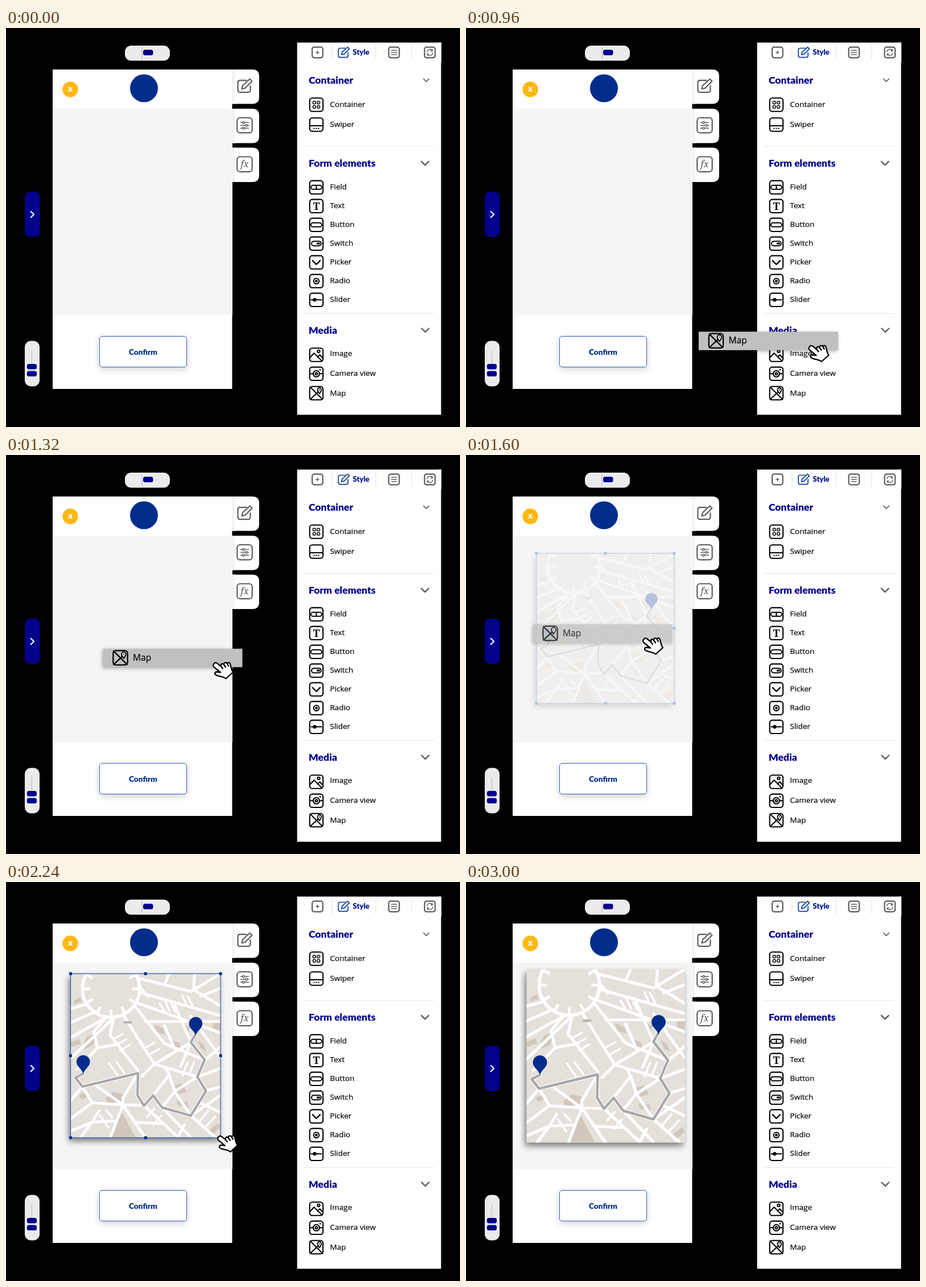
An HTML page for the animation above (3200 ms loop, 798 by 702 pixels).

```html
<!DOCTYPE html>
<html lang="en">
<head>
<meta charset="utf-8">
<title>Drag a map into the layout</title>
<style>
html, body { margin: 0; width: 100%; height: 100%; overflow: hidden; background: #000; }
svg { display: block; }
.head { font: 900 17.6px Lato, sans-serif; fill: #00008b; }
.bold { font: 900 13px Lato, sans-serif; fill: #002d8c; }
.item { font: 500 13.5px "Open Sans", "Noto Sans", sans-serif; fill: #000; stroke: #000; stroke-width: .2px; }
.line { fill: none; stroke-linecap: round; stroke-linejoin: round; }
.icon { stroke: #000; stroke-width: 2.1; }
.grey { stroke: #5c5c5c; stroke-width: 2.2; }
.blue { stroke: #0b3c9c; stroke-width: 2.2; }
.lift { filter: drop-shadow(-1px 2px 3px rgba(0,0,0,.3)); }
.deep { filter: drop-shadow(-3px 6px 5.5px rgba(0,0,0,.5)); }
.soft { filter: drop-shadow(0 3px 6px rgba(0,0,0,.2)); }
</style>
</head>
<body>
<svg id="stage" width="798" height="702" viewBox="0 0 798 702">
  <defs>
    <linearGradient id="edge"><stop stop-color="#ececec"/><stop offset="1" stop-color="#fff"/></linearGradient>
    <clipPath id="mapClip"><rect width="278" height="305"/></clipPath>
    <path id="pin" d="M0 0C-3 -10 -12.5 -13 -12.5 -22A12.5 12.5 0 0 1 12.5 -22C12.5 -13 3 -10 0 0Z" fill="#002d8c"/>
  </defs>
  <rect width="798" height="702"/>
  <g id="phone"></g>
  <g id="panel"></g>
  <g id="map">
    <rect id="mapBase" class="deep" fill="#e5e0d9"/>
    <g id="mapArt" clip-path="url(#mapClip)"></g>
    <g id="frame"></g>
  </g>
  <g id="bar">
    <rect class="lift" width="245" height="32.5" fill="#c1bfbf"/>
    <g id="barIcon" transform="translate(30.5 16) scale(1.08)"></g>
    <text class="item" x="52.5" y="21" style="font-size:15.6px">Map</text>
  </g>
  <path id="hand" fill="#fff" stroke="#000" stroke-width="2.3" stroke-linejoin="round"/>
</svg>
<script>
const $ = id => document.getElementById(id);
const path = (d, cls = "icon", extra = "") => `<path class="line ${cls}" d="${d}" ${extra}/>`;
const box = (x, y, w, h, r, fill, extra = "") =>
  `<rect x="${x}" y="${y}" width="${w}" height="${h}" rx="${r}" fill="${fill}" ${extra}/>`;
const text = (x, y, cls, s, extra = "") => `<text x="${x}" y="${y}" class="${cls}" ${extra}>${s}</text>`;
const at = (x, y, body, k = 1) => `<g transform="translate(${x} ${y}) scale(${k})">${body}</g>`;
const square = (r, cls) => `<rect class="line ${cls}" x="${-r}" y="${-r}" width="${2 * r}" height="${2 * r}" rx="${r * .38}"/>`;
const dot = (x, y, r, fill = "#000") => `<circle cx="${x}" cy="${y}" r="${r}" fill="${fill}"/>`;
const ring = (r, cls = "icon") => `<circle class="line ${cls}" r="${r}"/>`;

// Icon drawings, centred on the origin
const cells = [[-6, -6], [1.4, -6], [-6, 1.4], [1.4, 1.4]]
  .map(([x, y]) => box(x, y, 4.6, 4.6, 1, "none", 'stroke="#000" stroke-width="1.5"')).join("");
const pill = (x, y, w, h) => box(x, y, w, h, h / 2, "none", 'stroke="#000" stroke-width="1.9"');
const art = {
  Container: cells,
  Swiper: path("M-11.5 2H11.5") + dot(-4, 6.6, 1.2) + dot(0, 6.6, 1.2) + dot(4, 6.6, 1.2),
  Field: pill(-9.5, -3.5, 19, 7) + path("M0 -3V3"),
  Text: `<text y="6.5" text-anchor="middle" font-family="Noto Serif, serif" font-weight="700" font-size="18">T</text>`,
  Button: pill(-9.5, -3.5, 19, 7),
  Switch: pill(-8.5, -4, 17, 8) + path("M2 0H5", "icon", 'style="stroke-width:3.4"'),
  Picker: path("M-6.5 -3L0 3.7L6.5 -3", "icon", 'style="stroke-width:2.4"'),
  Radio: ring(4.8) + dot(0, 0, 2.4),
  Slider: path("M-9 0H9") + dot(-3, 0, 3.2),
  Image: path("M-11.5 5L-4 -3L10 11M2 4L6 0L11.5 6") + `<circle class="line icon" cx="4" cy="-6" r="2.2"/>`,
  "Camera view": ring(5.5) + ring(2) + path("M-11.5 0H-6M6 0H11.5M6 -7H7.5"),
  Map: path("M-11 -11L11 11M-11 11L3 -2") +
    path("M5.5 1C4 -2 2 -3.5 2 -6A3.5 3.5 0 0 1 9 -6C9 -3.5 7 -2 5.5 1Z", "icon", 'style="fill:#fff;stroke-width:1.8"') + dot(5.5, -6, 1)
};
const icon = name => square(11.7, "icon") + art[name];
const pencil = cls => path("M3 -10H-8Q-12 -10 -12 -6V7Q-12 11 -8 11H6Q10 11 10 7V0", cls) +
  path("M-5 5L-3.5 -1L9 -12.5L13 -8.5L1 3.5Z", cls);
const sliders = [-5, 0, 5].map((y, i) => {
  const x = [-2, 3, -2][i];
  return path(`M-7 ${y}H7`, "grey", 'style="stroke-width:1.4"') +
    `<circle class="line grey" cx="${x}" cy="${y}" r="1.8" style="fill:#fff;stroke-width:1.4"/>`;
}).join("");

function drawPhone() {
  const blue = "#04008a";
  const tab = (y, body) =>
    path(`M397 ${y}H433Q445 ${y} 445 ${y + 12}V${y + 48.5}Q445 ${y + 60.5} 433 ${y + 60.5}H397Z`, "", 'style="fill:#fff"') +
    box(398, y, 6, 60.5, 0, "url(#edge)") + at(419.5, y + 29.2, body);
  $("phone").innerHTML =
    box(209, 31, 79, 26.5, 11, "#ebebeb") + box(238.5, 33, 1, 21, 0, "#b5b5b5") + box(241, 38.3, 17.5, 9.7, 3.5, blue) +
    box(33, 288, 26.5, 79.5, 9, blue) + path("M43.7 322.8L49 328L43.7 333.2", "", 'stroke="#fff" stroke-width="2.2"') +
    box(33, 550.5, 26, 80, 11, "#ebebeb") + box(44.7, 567, 1, 25, 0, "#b5b5b5") +
    box(36.8, 591, 17.2, 9.5, 3.5, blue) + box(36.8, 603.5, 17.2, 9.5, 3.5, blue) +
    box(82, 73, 315.5, 562, 0, "#fff") + box(82, 142, 316, 363.5, 0, "#f5f5f5") +
    tab(73, pencil("grey")) + tab(142, square(13.2, "grey") + sliders) +
    tab(210.5, square(13.2, "grey") +
      `<text y="5.5" text-anchor="middle" font-family="Noto Serif, serif" font-style="italic" font-size="16" fill="#555">fx</text>`) +
    dot(113, 108, 13.7, "#fdb813") +
    text(113, 112.4, "bold", "x", 'text-anchor="middle" style="fill:#fff;font-size:15px"') +
    dot(242.5, 106, 24.5, "#002d8c") +
    box(164.5, 542.5, 153, 54, 4.5, "#fff", 'class="soft" stroke="#3a5db5"') +
    text(241, 575, "bold", "Confirm", 'text-anchor="middle" style="font-size:13.7px"');
}

function drawPanel() {
  const chevron = (x, y, r, w) =>
    path(`M${x - r} ${y - r / 2}L${x} ${y + r / 2}L${x + r} ${y - r / 2}`, "grey", `style="stroke-width:${w}"`);
  const row = (name, y, drop = 4) => at(545.5, y, icon(name)) + text(569.5, y + drop, "item", name);
  const rows = (names, y, gap) => names.map((n, i) => row(n, y + i * gap)).join("");
  $("panel").innerHTML =
    box(511.7, 25.6, 253, 654.9, 0, "#fff") + box(760, 25.6, 5.3, 35, 0, "#fff") +
    [573, 650, 713].map(x => box(x - .5, 30, 1, 26, 0, "#e0e0e0")).join("") +
    at(547.5, 43, square(9.3, "grey") + path("M-2.5 0H2.5M0 -2.5V2.5", "grey", 'style="stroke-width:1.6"')) +
    at(593.5, 43.2, pencil("blue"), .77) +
    text(609.5, 47.2, "bold", "Style", 'style="fill:#00168c"') +
    at(682, 43, square(9.3, "grey") + path("M-4.5 -3.7H4.5M-4.5 0H4.5M-4.5 3.7H4.5", "grey", 'style="stroke-width:1.5"')) +
    at(745, 43, square(9.3, "grey") +
      path("M-5 -1A5 5 0 0 1 4.5 -2.5V-5M4.5 -2.5H2M5 1A5 5 0 0 1 -4.5 2.5V5M-4.5 2.5H-2", "grey", 'style="stroke-width:1.4"')) +
    [["Container", 98], ["Form elements", 244], ["Media", 537.5]].map(([s, y]) => text(532, y, "head", s)).join("") +
    chevron(738.7, 92, 4.7, 1.6) + chevron(736.5, 238, 6.4, 2.4) + chevron(737, 531.7, 6.4, 2.4) +
    box(524, 207.8, 228.5, 1, 0, "#e3e3e3") + box(524, 501.8, 228.5, 1, 0, "#e3e3e3") +
    rows(["Container", "Swiper"], 135, 35) +
    rows(["Field", "Text", "Button", "Switch", "Picker", "Radio", "Slider"], 280.3, 33) +
    row("Image", 575, 2.3) + row("Camera view", 608.3) + row("Map", 642.5);
  $("barIcon").innerHTML = icon("Map");
}

function drawMap() {
  const blocks = [
    "M132 294C130 275 138 265 156 268L148 288Z", "M262 249L278 255L283 267L266 263Z", "M290 277L308 282L312 294L294 290Z",
    "M171 386L186 374L204 378V391L176 396Z", "M198 404L227 458H181Z", "M300 362L314 358L322 374L306 379Z",
    "M303 390L323 392L326 403L306 399Z", "M316 250L328 253L324 269Z", "M343 279L354 285L359 299L348 293Z",
    "M107 282L122 275L127 284L107 291Z", "M371 241L385 244V260L371 257Z", "M362 446L381 431L385 440L370 453Z",
    "M122 380L137 374L139 382L127 388Z", "M112 205L125 198L128 206L114 211Z"
  ];
  const roads = [
    "M107 219L137 211M107 245L150 226M107 273L172 236M107 312L187 236",
    "M172 236L150 262L157 292L119 332M187 236L180 268L232 334M157 292L196 285",
    "M205 231L262 322L342 346M226 214L281 284L356 315M232 188L385 232",
    "M232 209L385 264M246 243L385 243M281 250L300 294M300 213L330 281",
    "M214 154L250 196M235 163L330 187L385 154M290 154L281 174M337 154L335 184L385 214M348 196L385 181",
    "M330 282L311 326M262 322L239 345M262 322L330 282M356 315L385 290M342 346L385 330M330 233L385 310",
    "M129 364L107 390M129 364L147 394L107 424M147 394L204 398L181 458M150 359L204 398L245 458",
    "M232 339L204 385V398M204 398L243 399M107 447L147 430L160 409M126 458L147 430M147 430L187 428",
    "M243 399L306 458M277 403L330 458M330 418L375 458M345 393L385 412M330 418L385 380M358 372L385 364",
    "M260 380L290 342L300 373L342 346M290 342L282 328M300 373L276 403M300 373L330 418M225 430L280 433M306 458L318 435"
  ];
  const lanes = [
    "M272 209L281 224M283 207L291 224M294 211L302 226", "M314 194L322 212M324 196L333 213", "M185 276L204 266M192 286L211 276M199 297L217 286",
    "M252 305L271 294M245 292L263 282", "M162 418L177 440M173 408L184 421", "M262 405L249 420M275 418L261 434",
    "M178 320L194 343M192 318L207 339", "M324 319L314 343M336 318L328 339", "M346 428L362 409M358 438L375 420"
  ];
  let spokes = "";
  for (let a = 0; a < 360; a += 30) {
    spokes += `<path class="line" stroke="#fff" stroke-width="5" d="M52 0H39" style="stroke-linecap:butt" transform="rotate(${a})"/>`;
  }
  const white = (d, w) => path(d, "", `stroke="#fff" stroke-width="${w}"`);
  const route = "M130 340L116 347.5L129 364L232 339L231 380L243 399.5L260 380.5L277 403L330 418L358 372L342 346L355.5 314L330 281.5L338 267";
  $("mapArt").innerHTML = `<g transform="translate(-107 -154)">` +
    path(blocks.join(""), "", 'style="fill:#d2c7bd"') +
    white(roads.join(""), 5.2) + white(lanes.join(""), 3.6) +
    at(182, 182, `<circle r="53" fill="#e5e0d9" stroke="#fff" stroke-width="6"/>` + spokes) +
    `<ellipse cx="213" cy="244.5" rx="8.5" ry="2.7" fill="#bdb6af"/>` +
    white(route, 7) + path(route, "", 'stroke="#a8a8a8" stroke-width="4.5"') +
    `<use href="#pin" x="130.5" y="340"/><use href="#pin" x="339" y="269"/></g>`;
  $("hand").setAttribute("d",
    "M1 1.6C3 -1 5.5 -.3 8 2L13.5 6.5C12.5 2.5 15.5 .4 18.3 3C18.5 -.6 22 -1.6 24.3 1.6C25.2 -1.4 28.6 -1 29.8 3" +
    "C31.5 8.5 31 12 34.5 16.5L22 28C17 23.5 10.5 24.8 4.5 21.5C1.2 19.5 2.4 16 6 16L12.5 17L1.5 8C-1 5.8 -.8 3.6 1 1.6Z" +
    "M13.5 6.5L17 11M18.3 3L22 8.5M24.3 1.6L27 6.5");
}

const seg = (t, a, b) => Math.min(1, Math.max(0, (t - a) / (b - a)));
const mix = (a, b, p) => a + (b - a) * p;
const move = (el, x, y) => el.setAttribute("transform", `translate(${x} ${y})`);
const fade = (el, o) => { el.style.opacity = o; el.style.display = o > 0 ? "" : "none"; };

// Hand waypoints: time, x, y of the fingertip
const trail = [[120, 802, 664], [440, 709, 645], [800, 709, 645], [1400, 311.5, 322.5], [1680, 311.5, 322.5],
  [2000, 361, 434], [2400, 380, 455.5], [2600, 380, 455.5], [3000, 804, 672]];

function handAt(t) {
  let i = 0;
  while (i < trail.length - 2 && t > trail[i + 1][0]) i++;
  const [a, b] = [trail[i], trail[i + 1]], p = seg(t, a[0], b[0]);
  return [mix(a[1], b[1], p), mix(a[2], b[2], p)];
}

function placeMap(grow) {
  const x = mix(124, 106.5, grow), y = mix(173, 153.5, grow);
  const w = mix(242, 278, grow), h = mix(264, 305, grow);
  const base = $("mapBase");
  Object.entries({ x, y, width: w, height: h }).forEach(([k, v]) => base.setAttribute(k, v));
  $("mapArt").setAttribute("transform", `translate(${x} ${y}) scale(${w / 278} ${h / 305})`);
  let s = box(x, y, w, h, 0, "none", 'stroke="#2f55ad" stroke-width="1.2"');
  for (let i = 0; i < 9; i++) {
    if (i !== 4) s += box(x + w * (i % 3) / 2 - 2.5, y + h * Math.floor(i / 3) / 2 - 2.5, 5, 5, 0, "#002d8c");
  }
  $("frame").innerHTML = s;
}

function render(t) {
  const lift = seg(t, 400, 600), drag = seg(t, 800, 1400), drop = seg(t, 1560, 1720);
  move($("bar"), mix(515, 117.5, drag), mix(626.5, 620.3, lift) - 322.5 * drag);
  fade($("bar"), lift * (1 - drop));
  fade($("map"), drop);
  placeMap(seg(t, 2000, 2400));
  fade($("frame"), 1 - seg(t, 2600, 2760));
  move($("hand"), ...handAt(t));
}

drawPhone();
drawPanel();
drawMap();
const loop = 3200, step = 40, start = performance.now();
function tick(now) {
  const t = Math.max(0, now - start) % loop;
  render(Math.floor(t / step) * step);
  requestAnimationFrame(tick);
}
render(0);
requestAnimationFrame(tick);
</script>
</body>
</html>
```
